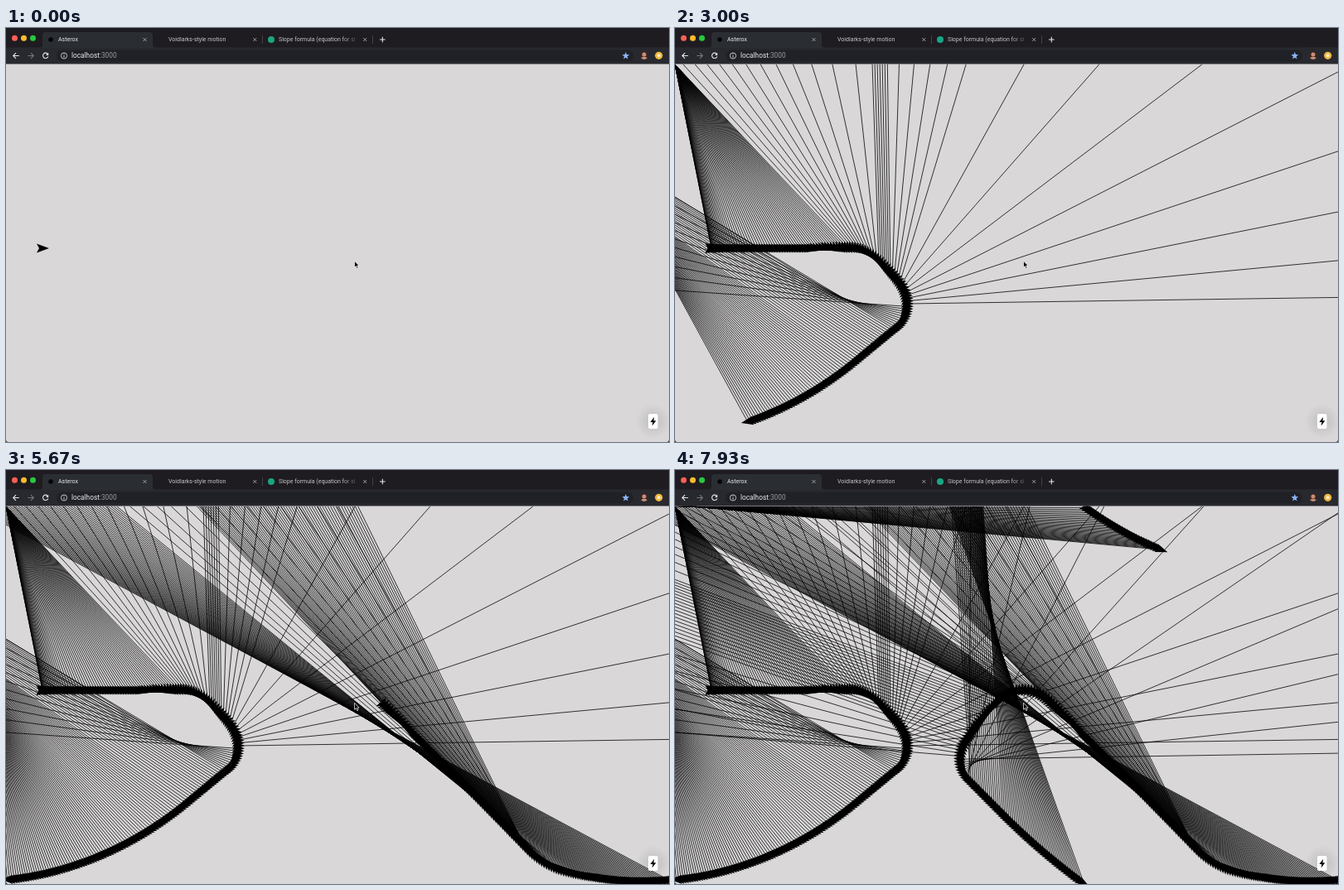
An HTML page for the animation above (8 s loop, 800 by 500 pixels).

```html
<!DOCTYPE html>
<html lang="en">
<head>
<meta charset="utf-8">
<title>Ship trail</title>
<style>
html, body { margin: 0; width: 100%; height: 100%; overflow: hidden; background: #d9d7d8; }
svg { display: block; width: 800px; height: 500px; }
text { font-family: Roboto, "Open Sans", sans-serif; }
.tab { font-size: 7px; fill: #c3c4c7; }
.icon { fill: none; stroke: #e6e7e9; stroke-width: 1.1; }
.dim { stroke: #75777b; }
.close { fill: none; stroke: #b5b6b9; stroke-width: .8; }
</style>
</head>
<body>
<svg viewBox="0 0 800 500">
  <defs>
    <linearGradient id="fade" x1="0" x2="1">
      <stop offset="0" stop-color="#1e1c21" stop-opacity="0"/>
      <stop offset="1" stop-color="#1e1c21"/>
    </linearGradient>
    <radialGradient id="glow">
      <stop offset=".2" stop-color="#000" stop-opacity=".1"/>
      <stop offset="1" stop-color="#000" stop-opacity="0"/>
    </radialGradient>
    <clipPath id="page"><rect y="43.5" width="800" height="456.5"/></clipPath>
    <clipPath id="face"><circle cx="770" cy="33" r="5"/></clipPath>
  </defs>

  <rect width="800" height="500" fill="#d9d7d8"/>
  <g id="trail" clip-path="url(#page)" stroke="#000" stroke-width=".78"></g>

  <!-- browser bar -->
  <rect width="800" height="24" fill="#1e1c21"/>
  <rect y="23.5" width="800" height="20" fill="#28292e"/>
  <path d="M40 24Q44 24 44 20V9Q44 5 48 5H173Q177 5 177 9V20Q177 24 181 24Z" fill="#2a2e32"/>
  <circle cx="10.5" cy="12.3" r="3.5" fill="#fe5f57"/>
  <circle cx="21.5" cy="12.3" r="3.5" fill="#febc2e"/>
  <circle cx="32.5" cy="12.3" r="3.5" fill="#28c840"/>
  <circle cx="54" cy="14" r="2.8" fill="#060607"/>
  <circle cx="320" cy="14" r="4" fill="#1aa583"/>
  <text class="tab" x="63" y="16.4" style="fill:#e8e9eb">Asterox</text>
  <text class="tab" x="196" y="16.4">Voidlarks-style motion</text>
  <text class="tab" x="329" y="16.4">Slope formula (equation for sl</text>
  <rect x="406" y="6" width="21" height="16" fill="url(#fade)"/>
  <path class="close" d="M165.5 12l4 4m0-4l-4 4M298.3 12l4 4m0-4l-4 4M431.2 12l4 4m0-4l-4 4"/>
  <path d="M309.5 9v10M442.5 9v10" stroke="#4b4b50" stroke-width=".8"/>
  <path class="icon" d="M454.3 10.7v6.6M451 14h6.6"/>
  <rect x="61" y="26.5" width="696" height="14" rx="7" fill="#202126"/>
  <path class="icon" d="M15.8 33.5H8.8M12 30.2L8.7 33.5L12 36.8"/>
  <path class="icon dim" d="M26.3 33.5h7M30 30.2L33.3 33.5L30 36.8"/>
  <path class="icon" d="M50.2 31.3A3.2 3.2 0 1 0 50.8 34.3"/>
  <path d="M51.2 29.7V32.9H48Z" fill="#e6e7e9"/>
  <circle class="icon" cx="70" cy="33.5" r="3.6" style="stroke-width:.8"/>
  <path d="M70 33v2.6M70 31.2v.9" stroke="#e6e7e9" stroke-width=".9"/>
  <text x="79" y="36.4" font-size="8.3" fill="#e8e9eb">localhost<tspan fill="#9a9ca0">:3000</tspan></text>
  <path d="M747.8 29L749 32.1L752.2 32.3L749.7 34.3L750.5 37.5L747.8 35.7L745.1 37.5L745.9 34.3L743.4 32.3L746.6 32.1Z" fill="#8ab4f8"/>
  <g clip-path="url(#face)">
    <rect x="765" y="28" width="10" height="10" fill="#3a2422"/>
    <circle cx="770" cy="32" r="2.5" fill="#c58f7c"/>
    <ellipse cx="770" cy="38" rx="4" ry="3.2" fill="#c58f7c"/>
  </g>
  <circle cx="787.7" cy="33.3" r="4.6" fill="#f3b73f"/>
  <circle cx="787.7" cy="33.3" r="2" fill="#fdf0cf"/>

  <!-- badge -->
  <circle cx="781" cy="475" r="21" fill="url(#glow)"/>
  <rect x="775" y="466" width="11.5" height="18" rx="2" fill="#fff"/>
  <path d="M782.2 469.8L777.4 476H780.4L779.6 480.6L784.4 474.2H781.4Z" fill="#000"/>

  <path d="M420.5 281.3V289.2L422.3 287.6L423.6 290.6L425 290L423.7 287.1H426Z" fill="#000" stroke="#fff" stroke-width=".7"/>
  <path d="M0 497.5Q.3 499.7 2.5 500H0ZM800 497.5Q799.7 499.7 797.5 500H800Z" fill="#333"/>
</svg>
<script>
const TOP = 44, W = 800, H = 456, LOOP = 8000;
const RATE = 60, SUB = 4, LOOK = .25;

// steering: from each moment to the next, course and speed change evenly
const course = [
  { t: .13, dir: 0, speed: 0 },
  { t: .48, dir: 0, speed: 184 },
  { t: 1.205, dir: 0, speed: 184 },
  { t: 1.41, dir: 45, speed: 200 },
  { t: 1.52, dir: 45.5, speed: 200 },
  { t: 1.6, dir: 53, speed: 200 },
  { t: 1.92, dir: 141, speed: 185 },
  { t: 2.25, dir: 141, speed: 205 },
  { t: 3, dir: 161, speed: 185 },
  { t: 4.2, dir: 193, speed: 145 },
  { t: 4.35, dir: 197, speed: 180 },
  { t: 4.6, dir: 226, speed: 235 },
  { t: 5.69, dir: 224, speed: 220 },
  { t: 6, dir: 135, speed: 210 },
  { t: 6.3, dir: 122, speed: 215 },
  { t: 6.54, dir: 45, speed: 215 },
  { t: 7.4, dir: 36, speed: 215 },
  { t: 8, dir: 21, speed: 185 }
];
// the last long turn only begins after a straight run
course.splice(-2, 0, { t: 6.8, dir: 45, speed: 215 });

const steer = t => {
  let i = 0;
  while (i < course.length - 2 && course[i + 1].t <= t) i++;
  const a = course[i], b = course[i + 1];
  const s = Math.min(1, Math.max(0, (t - a.t) / (b.t - a.t)));
  const mix = key => a[key] + (b[key] - a[key]) * s;
  return { dir: mix('dir'), speed: mix('speed') };
};

const rad = deg => deg * Math.PI / 180;
const wrap = (v, size) => ((v % size) + size) % size;

const trail = document.getElementById('trail');
const add = (d, extra) => {
  const el = document.createElementNS('http://www.w3.org/2000/svg', 'path');
  el.setAttribute('d', d);
  for (const key in extra) el.setAttribute(key, extra[key]);
  trail.appendChild(el);
  return el;
};

const addShip = (x, y, angle) => add('M8 0L-7-5.5L-4 0L-7 5.5Z', {
  transform: `translate(${x.toFixed(2)} ${y.toFixed(2)}) rotate(${angle.toFixed(1)})`,
  stroke: 'none'
});

// a ray to the top edge, aimed by the slope of the motion
const addRay = (x, y, dir) => {
  const end = Math.max(-2e4, Math.min(2e4, y * Math.tan(rad(dir))));
  return add(`M${x.toFixed(2)} ${(y + TOP).toFixed(2)}L${end.toFixed(2)} ${TOP}`);
};

// every step leaves a ship and its ray behind; the nose leads the course
const steps = [];
let px = 44, py = 266 - TOP;
for (let k = 0; k < RATE * LOOP / 1000; k++) {
  const t = k / RATE, x = wrap(px, W), y = wrap(py, H);
  const ray = steer(t).speed ? [addRay(x, y, steer(t).dir)] : [];
  steps.push([...ray, addShip(x, y + TOP, steer(t + LOOK).dir)]);
  for (let j = 0; j < SUB; j++) {
    const dt = 1 / RATE / SUB, { dir, speed } = steer(t + (j + .5) * dt);
    px += speed * dt * Math.cos(rad(dir));
    py += speed * dt * Math.sin(rad(dir));
  }
}

let shown = -1;
function draw(ms) {
  const tick = Math.floor(ms * .015 + .1);
  if (tick === shown) return;
  shown = tick;
  steps.forEach((parts, k) => {
    const display = k <= tick * 4 ? 'inline' : 'none';
    for (const el of parts) el.style.display = display;
  });
}

const start = performance.now();
function loop() {
  draw((performance.now() - start) % LOOP);
  requestAnimationFrame(loop);
}
draw(0);
requestAnimationFrame(loop);
</script>
</body>
</html>
```
